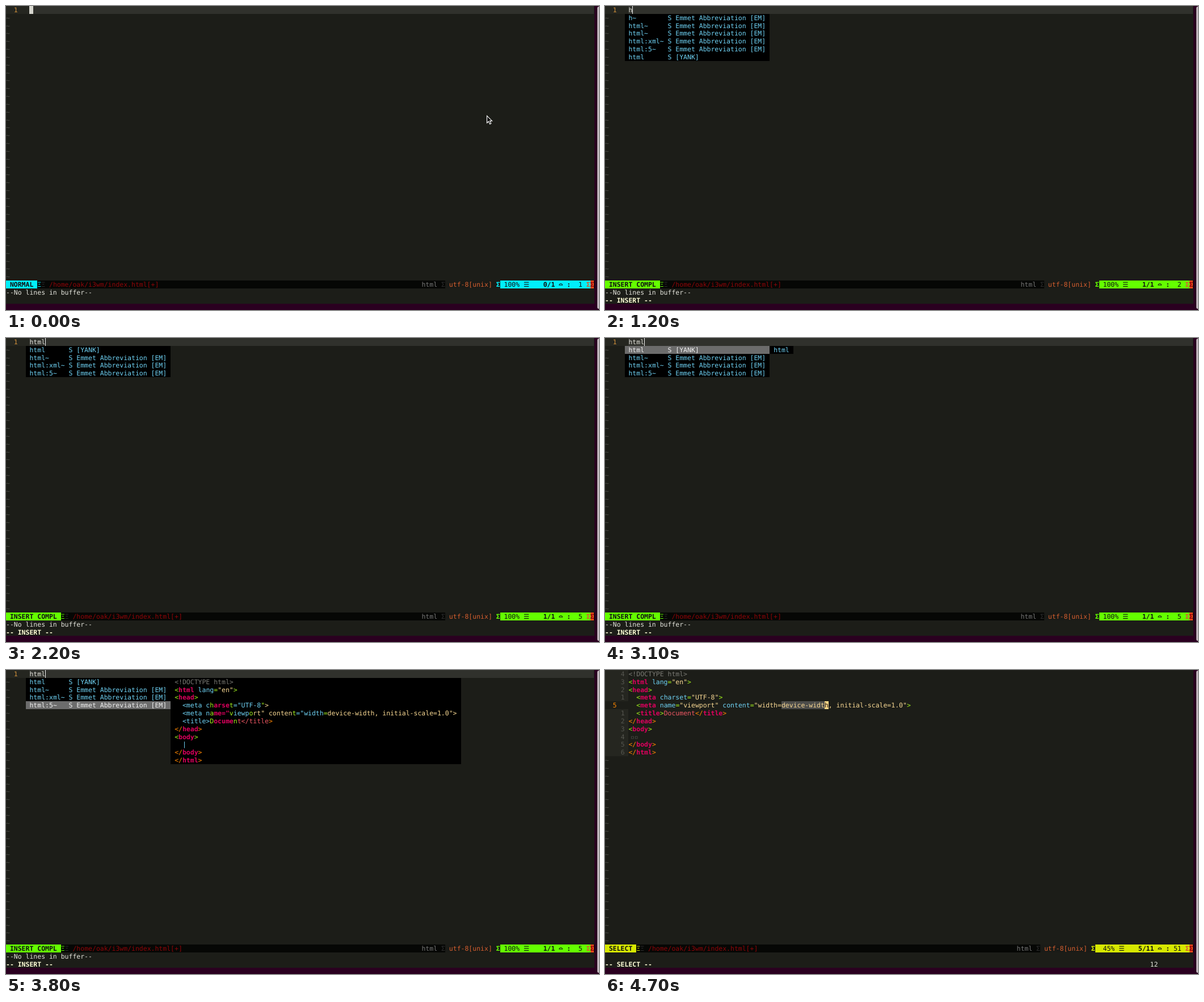
An HTML page for the animation above (8 s loop, 1045 by 536 pixels).

```html
<!DOCTYPE html>
<html lang="en">
<head>
<meta charset="utf-8">
<title>Snippet completion in a terminal editor</title>
<style>
html, body { margin: 0; width: 100%; height: 100%; overflow: hidden; background: #2a0020; }
#stage { position: relative; width: 1045px; height: 536px; overflow: hidden; }
#screen {
  position: absolute; left: 0; top: 0; width: 1037px; height: 525px;
  overflow: hidden; background: #1c1d18; color: #e4e4dc;
  font: 11.477px/13.83px "DejaVu Sans Mono", "DejaVu Sans", "Liberation Mono", monospace;
  text-rendering: geometricPrecision; font-variant-ligatures: none;
}
#screen span, #screen i { position: absolute; height: 13.83px; white-space: pre; }
#screen span { margin-top: 1px; }
#bar { position: absolute; left: 1042px; top: 1px; width: 3px; height: 533px; border-radius: 3px 0 0 3px; background: #c3b9bf; }
#mouse { position: absolute; left: 846px; top: 192px; }
.g { color: #a2f01c; }
.p { color: #e0005f; font-weight: bold; }
.c { color: #6fd3f5; }
.s { color: #f8d893; }
.o { color: #ff8700; }
.t { color: #ee5864; }
.d { color: #7a7a74; }
.tilde { color: #4b4c46; }
.num { color: #55564f; }
.cur { color: #d0903a; }
.sel { color: #f2f2f2; }
.dark { color: #101010; }
.b { font-weight: bold; }
.mode { color: #ffffd7; font-weight: bold; }
.path { color: #8f0508; }
.type { color: #767676; }
.enc { color: #d75f2f; }
.faint { color: #303030; }
</style>
</head>
<body>
<div id="stage">
  <div id="screen"></div>
  <div id="bar"></div>
  <svg id="mouse" width="14" height="18" viewBox="0 0 14 18">
    <path d="M1.5 1.5V14.2L4.4 11.5L6.6 16.2L8.8 15.2L6.7 10.6H10.6Z" fill="#111" stroke="#fff" stroke-width="1.1"/>
  </svg>
</div>
<script>
const W = 6.91, H = 13.83, LOOP = 8000;
const screenEl = document.getElementById('screen');
const mouseEl = document.getElementById('mouse');

const esc = s => s.replace(/&/g, '&amp;').replace(/</g, '&lt;');
const at = (row, col) => `left:${(col * W).toFixed(2)}px;top:${(row * H).toFixed(2)}px`;
const put = (row, col, text, cls = '', color = '') =>
  `<span class="${cls}" style="${at(row, col)}${color && ';color:' + color}">${esc(text)}</span>`;
const fill = (row, col, cols, color) =>
  `<i style="${at(row, col)};width:${(cols * W).toFixed(2)}px;background:${color}"></i>`;
const beam = col => `<i style="${at(0, col)};width:1px;background:#f0f0f0"></i>`;

// One class letter per character of an HTML line
function syntax(line) {
  const same = (c, s) => c.repeat(s.length);
  const openTag = tag => tag.replace(/<(\w+)|"[^"]*"|(?:lang|charset|name|content)(?==)|./g,
    (m, name) => name ? 'g' + same('p', name)
      : m[0] === '"' ? same('s', m)
      : m.length > 1 ? same('c', m) : 'g');
  return line.replace(/<!.*|<\/\w+>|<\w+[^>]*>|[^<]+/g, m =>
    m[0] !== '<' ? same(/\w/.test(m) ? 't' : 'c', m)
      : m[1] === '!' ? same('d', m)
      : m[1] === '/' ? 'oo' + 'p'.repeat(m.length - 3) + 'o'
      : openTag(m));
}

function code(row, col, line, shift = 0) {
  const classes = 'c'.repeat(shift) + syntax(line);
  let html = '';
  for (let i = 0, j; i < line.length; i = j) {
    for (j = i + 1; j < line.length && classes[j] === classes[i];) j++;
    html += put(row, col + i, line.slice(i, j), classes[i]);
  }
  return html;
}

const doc = [
  '<!DOCTYPE html>', '<html lang="en">', '<head>', '  <meta charset="UTF-8">',
  '  <meta name="viewport" content="width=device-width, initial-scale=1.0">',
  '  <title>Document</title>', '</head>', '<body>', '  |', '</body>', '</html>'
];

const emmet = name => [name, 'Emmet Abbreviation [EM]'];
const yank = ['html', '[YANK]'];
const listT = [emmet('html~'), emmet('html~'), emmet('html:xml~'), emmet('html:5~'), yank];
const listH = [emmet('h~'), ...listT];
const listFull = [yank, ...listT.slice(1, 4)];

function popup(items, picked) {
  return items.map(([word, kind], i) => {
    const row = i + 1, on = i === picked;
    return fill(row, 5, 37, on ? '#6c6c6c' : '#000') +
      put(row, 6, word.padEnd(10) + 'S ' + kind, on ? 'sel' : 'c');
  }).join('');
}

function preview(lines) {
  const width = Math.max(...lines.map(l => l.length)) + 2;
  return lines.map((line, i) => {
    const row = i + 1;
    return fill(row, 42, width, '#000') +
      (line === 'html' ? put(row, 43, line, 'c')
        : code(row, 43, line, line.startsWith('  <') ? 7 : 0));
  }).join('');
}

const modeColors = { NORMAL: '#00effc', INSERT: '#64ff00', SELECT: '#d7e800' };

function status({ mode, percent = '100%', line, col }) {
  const r = 35, color = modeColors[mode.slice(0, 6)];
  const end = mode.length + 2, right = line.length > 3 ? 125 : 126;
  return fill(r, 0, 150, '#060705') +
    fill(r, right - 14, 14, '#1a1b17') +
    fill(r, 0, end, color) + put(r, 1, mode, 'dark b') +
    put(r, end, 'Ξ', '', color) + put(r, end + 1, 'Ξ', 'faint') +
    put(r, end + 3, '/home/oak/i3wm/index.html[+]', 'path') +
    put(r, right - 20, 'html', 'type') + put(r, right - 15, 'Σ', 'faint') +
    put(r, right - 13, 'utf-8[unix]', 'enc') + put(r, right - 1, 'Σ', 'b', color) +
    fill(r, right, 149 - right, color) +
    put(r, 127, percent, 'dark') + put(r, 128 + percent.length, '☰', 'dark') +
    put(r, 140 - line.length, line, 'dark b') + put(r, 141, '⌓', 'dark b') +
    put(r, 143, ':', 'dark b') + put(r, 147 - col.length, col, 'dark') +
    put(r, 148, 'Σ', 'enc b') + fill(r, 149, 1, '#e8481c') + put(r, 149, 'Σ', 'path b');
}

function tildes(from) {
  let html = '';
  for (let row = from; row < 35; row++) html += put(row, 0, '~', 'tilde');
  return html;
}

function typing({ text = '', block, note, items, picked, shown, ...bar }) {
  return tildes(1) + fill(0, 0, 6, '#252620') + fill(0, 6, 144, '#30312c') +
    put(0, 2, '1', 'cur') + put(0, 6, text) +
    (block ? fill(0, 6, 1, '#d6d6ce') : beam(6 + text.length)) +
    (items ? popup(items, picked) : '') + (shown ? preview(shown) : '') +
    status(bar) + put(36, 0, '--No lines in buffer--') +
    (note ? put(37, 0, note, 'mode') : '');
}

function expanded(selected) {
  const rows = doc.map((line, i) => {
    const here = i === 4;
    return (here ? put(i, 2, '5', 'o')
      : fill(i, 0, 6, '#252620') + put(i, 4, String(Math.abs(i - 4)), 'num')) +
      (here && selected ? fill(i, 45, 11, '#4c4c4a') + fill(i, 56, 1, '#ffd787') : '') +
      (i === 8 ? put(i, 6.5, '▫▫', 'num') : code(i, 6, line)) +
      (here && selected ? put(i, 56, 'h', 'dark') : '');
  }).join('');
  return rows + tildes(doc.length) +
    status({ mode: 'SELECT', percent: '45%', line: '5/11', col: '51' }) +
    (selected ? put(37, 0, '-- SELECT --', 'mode') + put(37, 139, '12') : '');
}

const start = { mode: 'NORMAL', line: '0/1', col: '1' };
const insert = { mode: 'INSERT', line: '1/1', col: '2', text: 'h', note: '-- INSERT --' };
const compl = { ...insert, mode: 'INSERT COMPL' };
const full = { ...compl, text: 'html', col: '5', items: listFull };

const scenes = [
  [0, typing({ ...start, block: true })],
  [500, typing({ ...start, note: '-- INSERT --' })],
  [900, typing({ ...insert, note: '' })],
  [1000, typing(insert)],
  [1200, typing({ ...compl, items: listH })],
  [1400, typing({ ...compl, text: 'ht', col: '3', items: listT })],
  [2200, typing(full)],
  [3100, typing({ ...full, picked: 0, shown: ['html'] })],
  [3300, typing({ ...full, picked: 1, shown: ['<html>|</html>'] })],
  [3500, typing({ ...full, picked: 2, shown: ['<html xmlns="http://www.w3.org/1999/xhtml">|</html>'] })],
  [3800, typing({ ...full, picked: 3, shown: doc })],
  [4500, typing({ ...insert, text: 'html', col: '5' })],
  [4600, expanded(false)],
  [4700, expanded(true)]
];

const origin = performance.now();
let current = -1;

function tick() {
  const t = (performance.now() - origin) % LOOP;
  const index = scenes.findLastIndex(([from]) => from <= t);
  if (index !== current) {
    current = index;
    screenEl.innerHTML = scenes[index][1];
    mouseEl.style.display = index ? 'none' : '';
  }
  requestAnimationFrame(tick);
}
tick();
</script>
</body>
</html>
```
